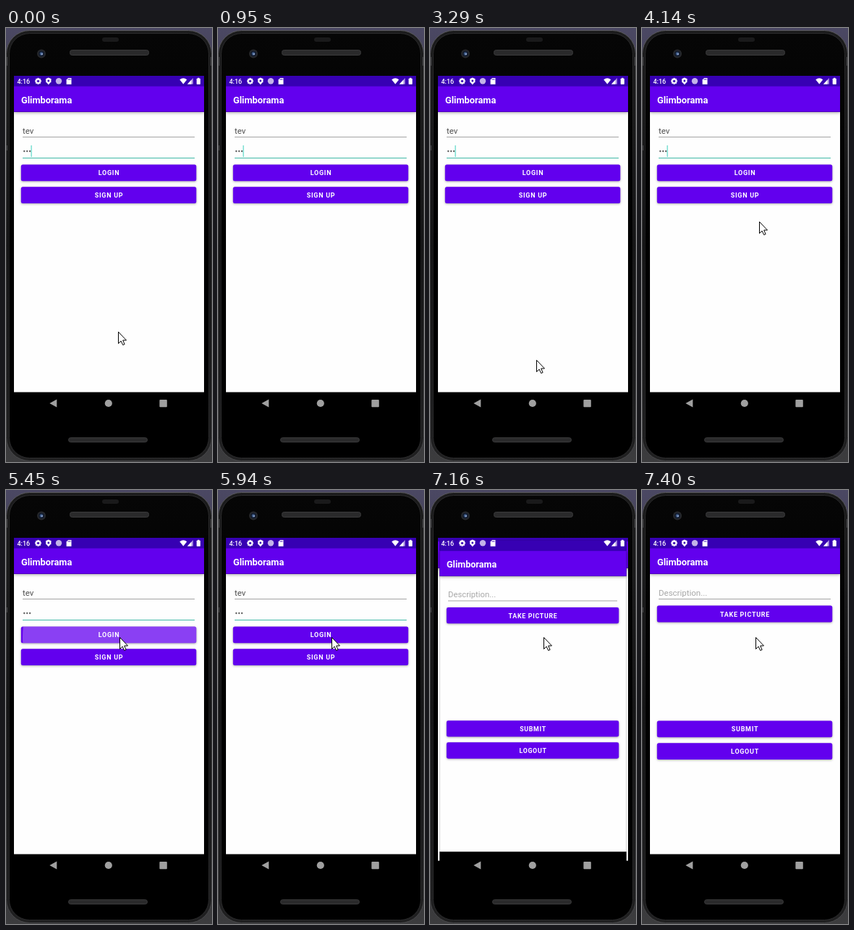
Write an HTML page with a canvas that moves like this. It is 285 px wide and 599 px high and loops after 8 s.

```html
<!DOCTYPE html>
<html lang="en">
<head>
<meta charset="utf-8">
<title>Login flow</title>
<style>
html, body { margin: 0; width: 100%; height: 100%; overflow: hidden; background: #000; }
canvas { display: block; width: 285px; height: 599px; }
</style>
</head>
<body>
<canvas id="stage" width="285" height="599"></canvas>
<script>
const ctx = document.getElementById('stage').getContext('2d');
const LOOP = 8000;
const PURPLE = '#6200ee', DARK_PURPLE = '#3700b3', WHITE = '#fff';
const SCREEN = { x: 11, y: 66, w: 263, h: 470, cx: 142.5, cy: 299 };
const APP_NAME = 'Glimborama', USER = 'tev';

const BLINK = 500, BLINK_PHASE = 55;
const POINTER_TICK = 139, EFFECT_TICK = 120;
const ENTER_AT = 2750, PRESS_AT = 5450, OPEN_AT = 7040;

// Pointer strokes: tick, x, y. Each stroke slows towards its end.
const leaving = [[0, 155, 419], [1, 155, 422], [2, 134, 364], [3, 226, 455]];
const entering = [[0, 123, 585], [5, 151, 434], [6, 150, 434], [10, 162, 267], [14, 157, 203]];

const ticksSince = (t, start, step) => Math.floor((t - start) / step);
const clamp = v => Math.min(1, Math.max(0, v));
const easeOut = (u, power) => 1 - (1 - clamp(u)) ** power;
const mix = (a, b, u) => a + (b - a) * u;

function follow(path, tick) {
  const next = path.findIndex(p => p[0] > tick);
  if (next < 0) return path.at(-1).slice(1);
  const [t0, x0, y0] = path[next - 1], [t1, x1, y1] = path[next];
  const u = easeOut((tick - t0) / (t1 - t0), 2);
  return [Math.round(mix(x0, x1, u)), Math.round(mix(y0, y1, u))];
}

function pointerAt(t) {
  if (t >= ENTER_AT) return follow(entering, ticksSince(t, ENTER_AT, POINTER_TICK));
  const tick = ticksSince(t, 0, POINTER_TICK);
  return tick <= leaving.at(-1)[0] ? follow(leaving, tick) : null;
}

function rect(x, y, w, h, color) {
  ctx.fillStyle = color;
  ctx.fillRect(x, y, w, h);
}

function roundRect(x, y, w, h, r, fill, stroke) {
  ctx.beginPath();
  ctx.roundRect(x, y, w, h, r);
  if (fill) { ctx.fillStyle = fill; ctx.fill(); }
  if (stroke) { ctx.strokeStyle = stroke; ctx.lineWidth = 1; ctx.stroke(); }
}

function disc(x, y, r, color) {
  ctx.fillStyle = color;
  ctx.beginPath();
  ctx.arc(x, y, r, 0, Math.PI * 2);
  ctx.fill();
}

function poly(color, ...points) {
  ctx.fillStyle = color;
  ctx.beginPath();
  points.forEach(([x, y]) => ctx.lineTo(x, y));
  ctx.closePath();
  ctx.fill();
}

function text(str, x, y, size, color, weight = 400, align = 'left', spacing = 0) {
  ctx.font = `${weight} ${size}px Roboto, sans-serif`;
  ctx.letterSpacing = spacing + 'px';
  ctx.textAlign = align;
  ctx.fillStyle = color;
  ctx.fillText(str, x, y);
}

function vertical(...colors) {
  const g = ctx.createLinearGradient(0, 0, 0, 599);
  colors.forEach((c, i) => g.addColorStop(i / (colors.length - 1), c));
  return g;
}

function withShadow(blur, alpha, draw) {
  ctx.save();
  ctx.shadowColor = `rgba(0,0,0,${alpha})`;
  ctx.shadowBlur = blur;
  ctx.shadowOffsetY = 1;
  draw();
  ctx.restore();
}

function button(label, y) {
  withShadow(3, 0.32, () => roundRect(20.8, y, 242.5, 22.8, 2.5, PURPLE));
  text(label, 142.5, y + 14.9, 8.96, WHITE, 700, 'center', 0.72);
}

function drawPhone() {
  rect(0, 0, 285, 599, vertical('#4b4863', '#2a2a2e', '#3c3c3e'));
  roundRect(0.5, 3.5, 284, 594, 32, vertical('#1b1b1c', '#151516', '#202021'),
    vertical('#59595b', '#2c2c2d', '#48484a'));
  roundRect(4.5, 7.5, 276, 586, 28, vertical('#060606', '#000', '#000'),
    vertical('#2b2b2c', '#161617', '#2b2b2c'));
  for (const x of [0, 283]) rect(x, 40, 2, 12, '#4a4a4c');
  rect(0, 162, 2, 7, '#444446');
  roundRect(133, 13, 23, 6, 3, '#1a1a1b');
  roundRect(88.5, 30.5, 109, 7, 3, '#2a2a2b', '#3a3a3b');
  roundRect(86.5, 565.5, 109, 6, 3, '#2a2a2b', '#3a3a3b');
  disc(49, 35.5, 6, '#27282b');
  disc(49, 35.5, 4, '#141c2c');
  disc(49, 35.5, 2.2, '#3f5c8a');
  disc(49.8, 36, 1.1, '#a5b5d6');
}

function drawShell() {
  rect(11, 66, 263, 470, '#000');
  rect(11, 116, 263, 386.6, '#fefefe');
  withShadow(4, 0.35, () => rect(11, 80, 263, 35.8, PURPLE));
  rect(11, 66, 263, 14.5, DARK_PURPLE);
  text(APP_NAME, 21, 104, 12.8, WHITE, 700);
}

function drawField(str, color) {
  text(str, 23, 145.8, 11.5, color);
  rect(23, 150, 238, 1, '#a3a3a3');
}

function drawLogin(caretOn, glow) {
  drawShell();
  drawField(USER, '#505050');
  for (let i = 0; i < 3; i++) disc(25.3 + i * 3.9, 170, 1.2, '#666');
  rect(23, 179, 238, 1, '#3fb9a6');
  if (caretOn) rect(34.5, 162, 1.2, 16, '#5bd8c8');
  button('LOGIN', 188.4);
  button('SIGN UP', 219.2);
  if (glow) {
    ctx.save();
    ctx.beginPath();
    ctx.roundRect(20.8, 188.4, 242.5, 22.8, 2.5);
    ctx.clip();
    disc(157, 203, 134, `rgba(255,255,255,${glow})`);
    ctx.restore();
  }
}

function drawPost() {
  drawShell();
  drawField('Description...', '#a8a8a8');
  button('TAKE PICTURE', 159.6);
  button('SUBMIT', 318.5);
  button('LOGOUT', 349.2);
}

function scaled(scale, draw) {
  ctx.save();
  ctx.beginPath();
  ctx.rect(SCREEN.x, SCREEN.y, SCREEN.w, SCREEN.h);
  ctx.clip();
  ctx.translate(SCREEN.cx, SCREEN.cy);
  ctx.scale(scale, scale);
  ctx.translate(-SCREEN.cx, -SCREEN.cy);
  draw();
  ctx.restore();
}

function drawStatusIcons() {
  text('4:16', 15.5, 76.8, 9, WHITE, 500);

  // Gear
  ctx.save();
  ctx.translate(44.5, 73.3);
  for (let i = 0; i < 4; i++) {
    rect(-1.1, -4.4, 2.2, 8.8, WHITE);
    ctx.rotate(Math.PI / 4);
  }
  disc(0, 0, 3.3, WHITE);
  disc(0, 0, 1.6, DARK_PURPLE);
  ctx.restore();

  // Shield
  poly(WHITE, [58.8, 68.6], [62.6, 70.2], [62.4, 74.3], [58.8, 78.2], [55.2, 74.3], [55, 70.2]);
  disc(58.8, 73, 1.4, DARK_PURPLE);

  disc(73, 73.3, 4.2, '#c3b3e8');

  // Memory card
  poly(WHITE, [86, 69], [90.5, 69], [90.5, 77.8], [83.6, 77.8], [83.6, 71.4]);
  for (let i = 0; i < 3; i++) rect(85.7 + i * 1.5, 70, 0.7, 1.8, DARK_PURPLE);

  // Wi-Fi
  ctx.fillStyle = WHITE;
  ctx.beginPath();
  ctx.moveTo(245.3, 77.6);
  ctx.lineTo(240.3, 71.2);
  ctx.quadraticCurveTo(245.3, 67.4, 250.3, 71.2);
  ctx.fill();

  // Signal
  poly('#a98fe0', [251, 77.6], [258.9, 69], [258.9, 77.6]);
  poly(WHITE, [251, 77.6], [256.6, 71.4], [256.6, 77.6]);

  // Battery
  rect(265.1, 68.8, 2.4, 1.2, WHITE);
  roundRect(263.7, 69.7, 5.2, 8, 0.6, WHITE);
}

function drawNavIcons() {
  const gray = '#a0a0a0';
  poly(gray, [60.3, 518], [70.3, 512.6], [70.3, 523.4]);
  disc(141.8, 518, 5.1, gray);
  roundRect(212.4, 513, 10.4, 10.2, 1, gray);
}

function drawPointer(x, y) {
  ctx.save();
  ctx.translate(x + 0.5, y + 0.5);
  ctx.lineWidth = 1;
  ctx.strokeStyle = '#000';
  poly(WHITE, [0, 0], [0, 16], [3.6, 12.5], [6.2, 18], [8.6, 17], [6.2, 11.5], [11, 11.5]);
  ctx.stroke();
  ctx.restore();
}

function render(t) {
  const caretOn = ticksSince(t, -BLINK_PHASE, BLINK) % 2 === 0;
  const pressTick = ticksSince(t, PRESS_AT, EFFECT_TICK);
  const glow = pressTick < 0 ? 0 : 0.25 * clamp(1 - pressTick / 2);
  const openTick = ticksSince(t, OPEN_AT, EFFECT_TICK);
  const opened = easeOut(openTick / 3, 5.4);
  const pointer = pointerAt(t);

  drawPhone();
  scaled(mix(1, 1.05, opened), () => drawLogin(caretOn, glow));
  if (opened > 0) scaled(mix(0.85, 1, opened), drawPost);
  drawStatusIcons();
  drawNavIcons();
  if (pointer) drawPointer(...pointer);
}

function tick() {
  render(performance.now() % LOOP);
  requestAnimationFrame(tick);
}
tick();
</script>
</body>
</html>
```
